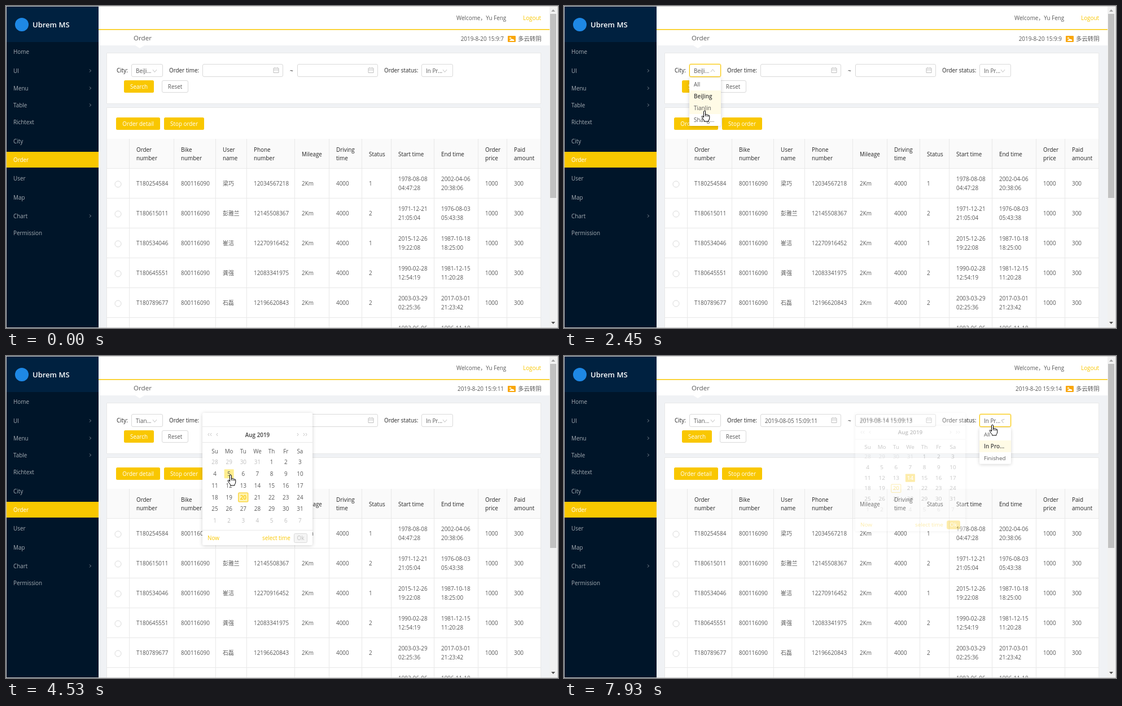
Recreate the animation shown at these times as an HTML page. Size 978x572 px, loop 8 s.

```html
<!DOCTYPE html>
<html lang="en">
<head>
<meta charset="utf-8">
<title>Order admin</title>
<style>
html, body { margin: 0; width: 100%; height: 100%; overflow: hidden; background: #fff; }
svg { display: block; width: 978px; height: 572px; }
text { font: 9.9px "Open Sans", "Noto Sans CJK SC", "Noto Sans CJK", sans-serif; fill: #595959; white-space: pre; }
.side { fill: #a6adb4; }
.white { fill: #fff; }
.dark { fill: #262626; }
.head { fill: #262626; font-weight: 500; }
.strong { fill: #404040; font-weight: 600; }
.yellow { fill: #f9c700; }
.pale { fill: #bfbfbf; }
.logo { font-size: 13px; font-weight: 600; fill: #fff; }
.title { font-size: 11.6px; }
.mid { text-anchor: middle; }
.end { text-anchor: end; }
.line { fill: none; stroke: #e8e8e8; }
.field { fill: #fff; stroke: #d9d9d9; }
.icon { fill: none; stroke: #bfbfbf; }
.popup { filter: drop-shadow(0 1px 3px rgba(0, 0, 0, .18)); }
.cursor { fill: #fff; stroke: #000; stroke-linejoin: round; }
</style>
</head>
<body>
<svg id="stage" viewBox="0 0 978 572"></svg>
<script>
const YELLOW = '#f9c700', CREAM = '#fffbe6', LOOP = 8000;
const stage = document.getElementById('stage');
const $ = id => document.getElementById(id);
const set = (id, name, value) => $(id).setAttribute(name, value);

// Text is placed by its left edge (or anchor) and the middle of its capitals.
const text = (x, y, label, cls = '', extra = '') =>
  `<text x="${x}" y="${y + 3.5}" class="${cls}" ${extra}>${label}</text>`;
const rect = (x, y, w, h, fill, extra = '') =>
  `<rect x="${x}" y="${y}" width="${w}" height="${h}" fill="${fill}" ${extra}/>`;
const path = (d, cls, extra = '') => `<path d="${d}" class="${cls}" ${extra}/>`;
const field = (x, y, w, h, id = '') =>
  `<rect id="${id}" x="${x + .5}" y="${y + .5}" width="${w}" height="${h}" rx="2.5" class="field"/>`;
const button = (x, y, w, label) =>
  rect(x, y, w, 22, YELLOW, 'rx="2.5"') + text(x + w / 2, y + 11, label, 'white mid');
const dateIcon = x => path(`M${x - 4} 110.5h9v8h-9zM${x - 4} 113.5h9M${x - 1.5} 109v2M${x + 2.5} 109v2`, 'icon');

function sidebar() {
  const items = [['Home', 81], ['UI', 115, 1], ['Menu', 146, 1], ['Table', 176, 1], ['Richtext', 206], ['City', 240],
    ['Order', 273], ['User', 306], ['Map', 340], ['Chart', 373, 1], ['Permission', 403]];
  return rect(1, 1, 163, 570, '#001529') + rect(1, 1, 163, 63, '#002140') +
    '<circle cx="28" cy="33" r="12" fill="#1e88e5"/>' + text(47, 34, 'Ubrem MS', 'logo') +
    rect(1, 259, 163, 28, YELLOW) +
    items.map(([label, y, sub]) => text(13, y, label, label === 'Order' ? 'white' : 'side') +
      (sub ? path(`M148 ${y - 2.5}l2.5 2.5l-2.5 2.5`, 'icon', 'style="stroke:#7f8a94"') : '')).join('');
}

function header() {
  return rect(164, 1, 799, 69, '#fff') + rect(164, 41, 799, 1.5, YELLOW) +
    path('M229 70h16l-8 5z', 'white') +
    text(798, 21, 'Welcome，Yu Feng') + text(916, 21, 'Logout', 'yellow') +
    text(226, 57, 'Order', 'title') + text(882, 58, '', 'end', 'id="clock"') +
    rect(889, 53, 14, 11, '#f9a60a', 'rx="1"') +
    '<circle cx="893.5" cy="57" r="1.8" fill="#ffe9a8"/>' + path('M892 62q0-2 2-2q1-3 3.500-1q3 0 3 3z', 'white') +
    text(907, 58, '多云转阴', '', 'style="font-size:10.4px"');
}

function select(id, x, label) {
  return rect(x - 1, 102, 58, 25, YELLOW, `id="${id}Ring" rx="4" opacity="0"`) + field(x, 103, 55, 22, id + 'Box') +
    text(x + 8, 115, label, '', `id="${id}Text"`) +
    path('M-3.5-2L0 2.500L3.500-2', 'icon', `id="${id}Arrow"`);
}

function filters() {
  return rect(179, 84, 769, 89, '#fff') + path('M178.500 83.500h769v90h-769z', 'line') +
    text(196, 114, 'City:', 'dark') + select('city', 222, 'BeiJi...') +
    text(289, 114, 'Order time:', 'dark') + field(348, 103, 142, 22) + dateIcon(478) + text(356, 115, '', '', 'id="from"') +
    text(503, 115, '~', 'dark') + field(516, 103, 142, 22) + dateIcon(646) + text(524, 115, '', '', 'id="to"') +
    text(670, 114, 'Order status:', 'dark') + select('status', 736, 'In Pr...') +
    button(209, 132, 53, 'Search') + field(276, 132, 46, 21) + text(299.5, 143, 'Reset', 'mid');
}

function table() {
  const edges = [219, 298, 372, 427, 512, 573, 631, 683, 759, 837, 888, 948];
  const titles = ['Order number', 'Bike number', 'User name', 'Phone number', 'Mileage', 'Driving time', 'Status',
    'Start time', 'End time', 'Order price', 'Paid amount'];
  const oneLine = ['Start time', 'End time'];
  const rows = [
    ['T180254584', '梁巧', '12034567218', 1, '1978-08-08 04:47:28', '2002-04-06 20:38:06'],
    ['T180615011', '彭雅兰', '12145508367', 2, '1971-12-21 21:05:04', '1976-08-03 05:43:38'],
    ['T180534046', '崔洁', '12270916452', 1, '2015-12-26 19:22:08', '1987-10-18 18:25:00'],
    ['T180645551', '龚强', '12083341975', 2, '1990-02-28 12:54:19', '1981-12-15 11:20:28'],
    ['T180789677', '石磊', '12196620843', 2, '2003-03-29 02:25:36', '2017-03-01 21:23:42'],
    ['', '', '', '', '1983-06-06 10:12:45', '1996-11-18 08:31:07']];
  const cell = (i, y, label, cls, split) => {
    const lines = split ? String(label).split(' ') : [label];
    return lines.map((s, k) => text(edges[i] + 12, y + (k - (lines.length - 1) / 2) * 15.5, s, cls)).join('');
  };
  let out = rect(179, 181, 769, 391, '#fff') + path('M178.500 572V180.500h769V572', 'line') +
    button(195, 198, 78, 'Order detail') + button(280, 198, 71, 'Stop order') + rect(179, 236, 769, 52, '#fafafa');
  titles.forEach((label, i) => out += cell(i, 263, label, 'head', !oneLine.includes(label)));
  rows.forEach(([order, user, phone, status, start, end], r) => {
    const y = 316 + r * 53, full = order !== '';
    out += path(`M179 ${288.5 + r * 53}h769`, 'line') +
      `<circle cx="198.500" cy="${y + .5}" r="5.500" class="field"/>`;
    [order, full && '800116090', user, phone, full && '2Km', full && 4000, status, start, end, full && 1000, full && 300]
      .forEach((v, i) => { if (v) out += cell(i, y - .5, v, '', i === 7 || i === 8); });
  });
  return out + edges.map(x => path(`M${x - .5} 236V572`, 'line')).join('');
}

function scrollbar() {
  return rect(963, 1, 14, 570, '#f1f1f1') + rect(964, 14, 11, 327, '#c1c1c1') +
    path('M966 10h7l-3.500-4z', '', 'fill="#a3a3a3"') + path('M966 561h7l-3.500 4z', '', 'fill="#505050"');
}

function menu(id, x, options, chosen) {
  return `<g id="${id}Menu" class="popup">` + rect(0, 0, 56, options.length * 21 + 1, '#fff', 'rx="2"') +
    options.map((label, i) => rect(0, i * 21 + 1, 56, 21, 'none', `id="${id}${i}"`) +
      text(8, i * 21 + 11.5, label, i === chosen ? 'strong' : '')).join('') + '</g>';
}

const cellAt = i => ({ x: 22 + (i % 7) * 25.15, y: 87.5 + Math.floor(i / 7) * 20.85 });
const dayOf = i => (i + 27) % 31 + 1;

function calendar(id) {
  let out = `<g id="${id}" class="popup">` + rect(0, 0, 195, 235, '#fff', 'rx="2.5"') +
    text(8, 13.5, '', '', `id="${id}Value"`) + rect(8, 7, 1, 13, '#222', `id="${id}Caret"`) +
    path('M0 24.500h195M0 52.500h195M0 208.500h195', 'line') + text(97.5, 39, 'Aug 2019', 'strong mid') +
    path('M12 36l-2 2.500l2 2.500M16 36l-2 2.500l2 2.500M27 36l-2 2.500l2 2.500M168 36l2 2.500l-2 2.500M179 36l2 2.500l-2 2.500M183 36l2 2.500l-2 2.500', 'icon');
  ['Su', 'Mo', 'Tu', 'We', 'Th', 'Fr', 'Sa'].forEach((d, i) => out += text(cellAt(i).x, 68, d, 'mid'));
  for (let i = 0; i < 42; i++) {
    const { x, y } = cellAt(i), inMonth = i > 3 && i < 35;
    out += rect(x - 8.5, y - 8, 17, 16, 'none', `id="${id}Cell${i}" rx="1"`) +
      text(x, y, dayOf(i), 'mid ' + (inMonth ? '' : 'pale'), `id="${id}Day${i}"`);
  }
  return out + text(9, 222, 'Now', 'yellow') + text(106, 222, 'select time', 'yellow') +
    `<rect id="${id}Ok" x="162.500" y="214.500" width="23" height="16" rx="2"/>` +
    text(174, 222.5, 'Ok', 'mid', `id="${id}OkText"`) + '</g>';
}

const cursors = `<g id="arrow" class="cursor"><path d="M0 0V14.500L3.400 11.500L5.800 17L8.200 16L5.800 10.700H10.300Z"/></g>
  <g id="hand" class="cursor"><path d="M-1.500 12V1Q0-1 1.500 1V7Q3 5.500 4.200 7.200Q5.700 6.200 6.700 8Q8.800 7.500 8.800 10V13Q8.500 16 7 17.500V19H-.5V17.500Q-3 14.500-5 10.500Q-4.500 8.500-2.800 10Z"/><path d="M1.500 7v3M4.200 8v2.500M6.700 8.500v2" fill="none"/></g>
  <g id="beam" class="cursor"><path d="M-3-7h2l1 1l1-1h2M0-6V6M-3 7h2l1-1l1 1h2" fill="none"/></g>`;

stage.innerHTML = rect(0, 0, 978, 572, '#f0f2f5') + header() + filters() + table() + sidebar() + scrollbar() +
  menu('city', 222, ['All', 'BeiJing', 'TianJin', 'Shang...'], 1) + menu('status', 736, ['All', 'In Pro...', 'Finished'], 1) +
  calendar('calA') + calendar('calB') + cursors +
  '<rect x=".5" y=".5" width="977" height="571" fill="none" stroke="#c9c9c9"/>';

const clamp = v => Math.min(1, Math.max(0, v));
const ease = p => p * p * (3 - 2 * p);

// Popups enter with a quint ease-out and leave with a quint ease-in, 200 ms each.
const openness = (t, open, close) =>
  t < close ? 1 - (1 - clamp((t - open) / 200)) ** 5 : 1 - clamp((t - close) / 200) ** 5;

function showPopup(id, x, y, level) {
  set(id, 'transform', `translate(${x} ${y}) scale(1 ${.8 + .2 * level})`);
  set(id, 'opacity', level ** 1.5);
  set(id, 'visibility', level > 0 ? 'visible' : 'hidden');
}

// Time, x, y of the pointer.
const route = [[220, 133, 501], [900, 236, 262], [1500, 260, 119], [1880, 260, 119], [2450, 249, 186], [3030, 249, 186],
  [3500, 418, 117], [3750, 418, 117], [4400, 398, 211], [4680, 398, 211], [5290, 601, 119], [5840, 601, 119],
  [6330, 615, 231], [6890, 615, 231], [6970, 629, 223], [7740, 759, 122], [LOOP, 759, 122]];

function pointer(t) {
  const i = Math.max(1, route.findIndex(k => k[0] >= t));
  const [t0, x0, y0] = route[i - 1], [t1, x1, y1] = route[i];
  const p = ease(clamp((t - t0) / (t1 - t0)));
  return { x: x0 + (x1 - x0) * p, y: y0 + (y1 - y0) * p };
}

const inside = (p, x, y, w, h) => p.x >= x && p.x < x + w && p.y >= y && p.y < y + h;

function hoveredDay(p, x) {
  for (let i = 0; i < 42; i++) {
    const c = cellAt(i);
    if (inside(p, x + c.x - 9, 101 + c.y - 9, 18, 18)) return i;
  }
  return -1;
}

function drawSelect(id, x, p, t, open, close, blur) {
  const hover = inside(p, x, 103, 56, 23), focus = t >= open && t < blur;
  const turn = clamp((t - open) / 180) - clamp((t - close) / 180);
  set(id + 'Box', 'style', hover || focus ? 'stroke:' + YELLOW : '');
  set(id + 'Ring', 'opacity', focus ? .25 : 0);
  set(id + 'Arrow', 'transform', `translate(${x + 41.5} 115) rotate(${turn * 180})`);
  showPopup(id + 'Menu', x, 128, openness(t, open, close));
  return hover;
}

function drawCalendar(id, x, p, t, times, day, value) {
  const level = openness(t, times.open, times.close), picked = t >= times.pick;
  const hover = hoveredDay(p, x);
  showPopup(id, x, 101, level);
  for (let i = 0; i < 42; i++) {
    const chosen = picked && i === day, today = i === 23;
    const fill = chosen ? YELLOW : i === hover ? '#ffee8f' : today && !picked ? '#fff3b0' : 'none';
    set(`${id}Cell${i}`, 'fill', fill);
    set(`${id}Cell${i}`, 'stroke', today ? YELLOW : 'none');
    $(`${id}Day${i}`).style.cssText = chosen ? 'fill:#fff;font-weight:600' : today ? `fill:${YELLOW};font-weight:600` : '';
  }
  $(id + 'Value').textContent = picked ? value : '';
  set(id + 'Caret', 'opacity', !picked && (t - times.open) % 1000 < 500 ? 1 : 0);
  set(id + 'Ok', 'fill', picked ? YELLOW : '#f5f5f5');
  set(id + 'Ok', 'stroke', picked ? YELLOW : '#d9d9d9');
  set(id + 'OkText', 'class', picked ? 'mid white' : 'mid pale');
  return { level, hover };
}

function pointerShape(p, onSelect, cityOpen, calendars) {
  if (p.x < 164 || onSelect || (cityOpen && inside(p, 222, 128, 56, 85))) return 'hand';
  for (const { x, level, hover } of calendars)
    if (level > .5 && inside(p, x, 101, 195, 235))
      return p.y < 126 ? 'beam' : hover >= 0 ? 'hand' : 'arrow';
  if (inside(p, 348, 103, 143, 23) || inside(p, 516, 103, 143, 23)) return 'beam';
  return inside(p, 209, 132, 53, 22) || inside(p, 195, 198, 156, 22) ? 'hand' : 'arrow';
}

function render(now) {
  const t = now % LOOP, p = pointer(t);
  const fromValue = '2019-08-05 15:09:11', toValue = '2019-08-14 15:09:13';
  const timesA = { open: 3650, pick: 4610, close: 5330 }, timesB = { open: 5480, pick: 6580, close: 7755 };
  $('clock').textContent = '2019-8-20 15:9:' + (7 + Math.floor((t + 10) / 1000));

  const onCity = drawSelect('city', 222, p, t, 1765, 2780, 3650);
  const onStatus = drawSelect('status', 736, p, t, 7825, LOOP * 2, LOOP * 2);
  $('cityText').textContent = t < 2780 ? 'BeiJi...' : 'Tian...';
  for (let i = 0; i < 4; i++) {
    const over = inside(p, 222, 129 + i * 21, 56, 21);
    set('city' + i, 'fill', over || i === 1 ? CREAM : 'none');
  }
  set('status1', 'fill', CREAM);

  const a = drawCalendar('calA', 348, p, t, timesA, 8, fromValue);
  const b = drawCalendar('calB', 516, p, t, timesB, 17, toValue);
  $('from').textContent = t >= timesA.pick ? fromValue : '';
  $('to').textContent = t >= timesB.pick ? toValue : '';

  const shape = pointerShape(p, onCity || onStatus, t > 1765 && t < 2780, [{ x: 348, ...a }, { x: 516, ...b }]);
  for (const id of ['arrow', 'hand', 'beam']) {
    set(id, 'visibility', id === shape && t >= 220 ? 'visible' : 'hidden');
    set(id, 'transform', `translate(${p.x} ${p.y})`);
  }
}

function loop() {
  render(performance.now());
  requestAnimationFrame(loop);
}
loop();
</script>
</body>
</html>
```
